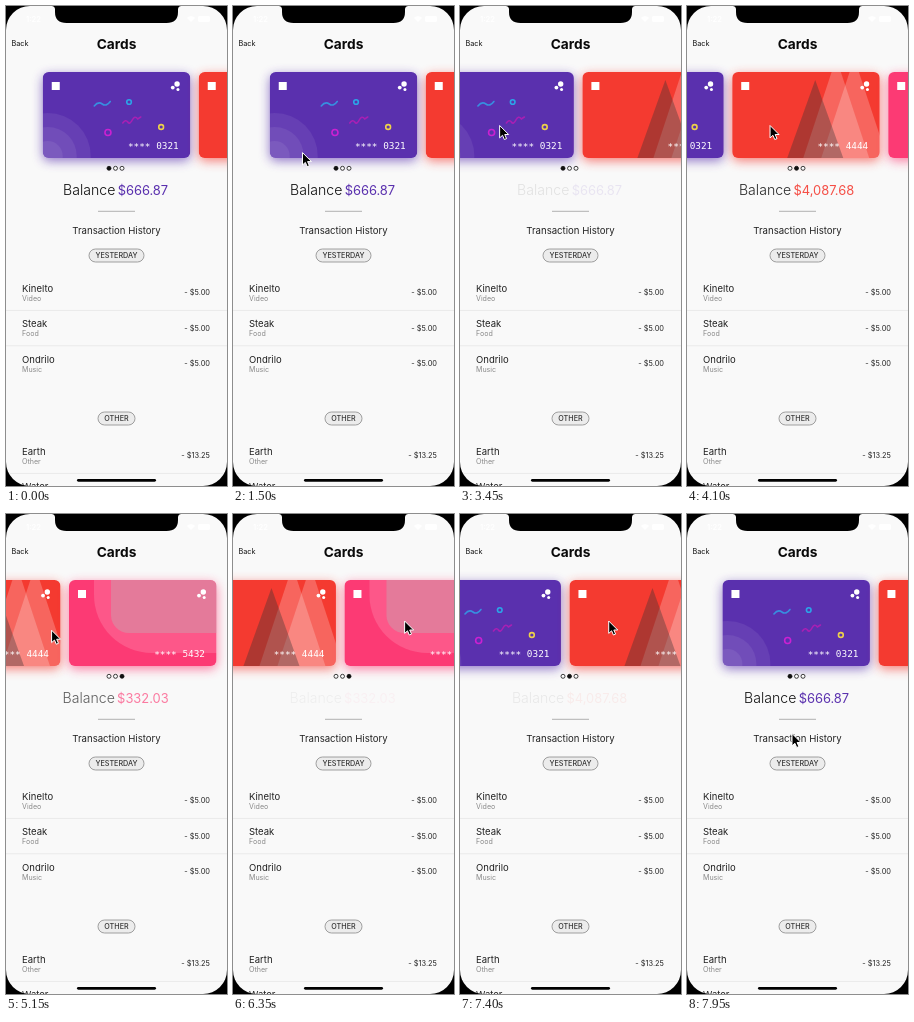
Recreate the animation shown at these times as an HTML page. Size 221 by 480 pixels, loop 8 s.

```html
<!DOCTYPE html>
<html lang="en">
<head>
<meta charset="utf-8">
<title>Cards</title>
<style>
html, body { margin: 0; width: 100%; height: 100%; overflow: hidden; background: #000; }
svg { display: block; width: 100%; height: 100%; font-family: Inter, "Open Sans", sans-serif; }
.num { font: 9.4px "DejaVu Sans Mono", monospace; fill: #fff; text-anchor: end; }
.mid { text-anchor: middle; }
.ring { fill: none; stroke-linecap: round; stroke-width: 1.6; }
</style>
</head>
<body>
<svg viewBox="0 0 221 480">
  <defs>
    <clipPath id="screen"><rect width="221" height="480" rx="24"/></clipPath>
    <clipPath id="face"><rect width="147.5" height="86" rx="6"/></clipPath>
    <filter id="blur" x="-20%" y="-35%" width="140%" height="170%"><feGaussianBlur stdDeviation="5.5"/></filter>
  </defs>
  <g clip-path="url(#screen)">
    <rect width="221" height="480" fill="#f9f9f9"/>
    <g fill="#fff">
      <text x="20" y="16" font-size="7.5" font-weight="600">1:22</text>
      <rect x="192" y="10" width="12" height="6" rx="1.5"/>
      <path d="M181 12q4-4 8 0l-4 4z"/>
    </g>
    <text x="5.5" y="40.3" font-size="7.3" fill="#111">Back</text>
    <text class="mid" x="110.5" y="43" font-size="13.7" font-weight="700" fill="#0a0a0a">Cards</text>
    <g id="cards"></g>
    <g id="dots" stroke="#111" stroke-width=".8"></g>
    <text id="balance" class="mid" x="109.6" y="188.9" font-size="14.1" font-weight="300" fill="#111">Balance<tspan id="amount" dx="2.3" font-size="12.9" font-weight="400"></tspan></text>
    <path d="M92 205.3H129" stroke="#aaa" stroke-width=".9"/>
    <text class="mid" x="110.5" y="228" font-size="9.6" fill="#222">Transaction History</text>
    <g id="list"></g>
    <rect x="71" y="473" width="79" height="2.7" rx="1.35"/>
  </g>
  <path d="M45.5 0Q49 0 49 3.5V6Q49 17 60.5 17H160.5Q172 17 172 6V3.5Q172 0 175.5 0Z"/>
  <path id="cursor" d="M0 0V12.4L2.9 9.800L4.700 14L6.900 13.100L5.100 9H9Z" stroke="#fff" stroke-width="1"/>
</svg>
<script>
const $ = id => document.getElementById(id);
const LOOP = 8000, PITCH = 156, LEFT = 36.75, PULL = 74, SETTLE = 115;

const cards = [
  { color: '#5a30ae', sum: '$666.87', last: '0321', art: `
    <g fill="#fff" fill-opacity=".07">${[43, 29, 15].map(r => `<circle cx="5" cy="84" r="${r}"/>`).join('')}</g>
    <g class="ring">
      <path d="M51.5 34q4-5 8-2t8-2.5" stroke="#378fe0"/>
      <circle cx="86.300" cy="30" r="2.300" stroke="#2ba4e8"/>
      <circle cx="65.200" cy="60.500" r="3" stroke="#cb20d2"/>
      <path d="M80 51q3-4 5-1t4.500-2t5.500-1l3-2" stroke="#a81fb4"/>
      <circle cx="118.400" cy="55" r="2.400" stroke="#ecd04a"/>
    </g>` },
  { color: '#f43a30', sum: '$4,087.68', last: '4444', art: `
    <path id="peak" d="M104 -14l33 100h-66z" fill="#fff" fill-opacity=".22"/>
    <use href="#peak" x="18"/>
    <path d="M83 8l28 78h-56z" fill="#333" fill-opacity=".36"/>` },
  { color: '#fc3a74', sum: '$332.03', last: '5432', art: `
    <path d="M25 0V15A58 58 0 0 0 83 73H148V0Z" fill="#fff" fill-opacity=".15"/>
    <path d="M42 0V35A18 18 0 0 0 60 53H148V0Z" fill="#b8b8b8" fill-opacity=".36"/>` }
];

$('cards').innerHTML = cards.map((c, i) => `<g transform="translate(${i * PITCH} 0)">
  <rect y="3" width="147.5" height="86" rx="6" fill="${c.color}" opacity=".65" filter="url(#blur)"/>
  <g clip-path="url(#face)"><rect width="147.5" height="86" fill="${c.color}"/>${c.art}</g>
  <rect x="9" y="10" width="8" height="8" fill="#fff"/>
  <g fill="#fff"><circle cx="134.300" cy="12" r="2.700"/><circle cx="130" cy="15.600" r="1.900"/><circle cx="135.200" cy="17.500" r="1.500"/></g>
  <text class="num" x="136" y="76.800"><tspan dy="1">****</tspan><tspan dy="-1"> ${c.last}</tspan></text></g>`).join('');

$('dots').innerHTML = cards.map((c, i) => `<circle cx="${103 + i * 6.5}" cy="162.300" r="2"/>`).join('');
const dots = [...$('dots').children];

const chip = (label, y, w) => `<rect x="${110.5 - w / 2}" y="${y}" width="${w}" height="13" rx="6.5" fill="#ececec" stroke="#8a8a8a" stroke-width=".8"/>
  <text class="mid" x="110.5" y="${y + 9.2}" font-size="7.200" font-weight="500" fill="#333">${label}</text>`;

const row = ([name, kind, cost], y) => `<text x="16" y="${y}" font-size="9.500" fill="#222">${name}</text>
  <text x="16" y="${y + 9.2}" font-size="7.100" fill="#888">${kind}</text>
  <text x="204" y="${y + 3.6}" font-size="7.400" text-anchor="end" fill="#222">- ${cost}</text>`;

// A chip followed by rows with a rule between them
const section = (label, y, w, rows) => chip(label, y, w) + rows.map((r, i) => {
  const base = y + 42.8 + i * 35.4;
  return row(r, base) + (i ? `<path d="M0 ${base - 16.8}H221" stroke="#e6e6e6" stroke-width=".8"/>` : '');
}).join('');

$('list').innerHTML =
  section('YESTERDAY', 243, 55, [['Kinelto', 'Video', '$5.00'], ['Steak', 'Food', '$5.00'], ['Ondrilo', 'Music', '$5.00']]) +
  section('OTHER', 406, 37, [['Earth', 'Other', '$13.25'], ['Water', 'Other', '$5.00']]);

// Each swipe holds the card from grab to release, then the page snaps
const swipes = [
  { grab: 1900, release: 3840, x: 110, y: 119.5, dir: 1 },
  { grab: 4390, release: 5020, x: 101, y: 119.5, dir: 1 },
  { grab: 5950, release: 6350, x: 98, y: 107, dir: -1 },
  { grab: 6850, release: 7475, x: 76, y: 107, dir: -1 }
];

const drag = (w, t) => PULL * Math.sin(Math.PI / 2 * (t - w.grab) / (w.release - w.grab));

function travel(w, t) {
  if (t < w.grab) return 0;
  if (t < w.release) return drag(w, t);
  return PITCH - (PITCH - PULL) * Math.exp((w.release - t) / SETTLE);
}

// The pointer glides from stop to stop between swipes
const stops = [
  { t: 50, x: 2, y: 168 }, { t: 850, x: 199, y: 67 }, { t: 1350, x: 33, y: 171 },
  ...swipes.flatMap(w => [
    { t: w.grab, x: w.x, y: w.y },
    { t: w.release, x: w.x - w.dir * PULL, y: w.y }
  ]),
  { t: 7950, x: 105, y: 219.5 }
];

function pointer(t) {
  const held = swipes.find(w => t >= w.grab && t < w.release);
  if (held) return [held.x - held.dir * drag(held, t), held.y];
  const next = stops.findIndex(p => p.t > t);
  const b = stops.at(next), a = next > 0 ? stops[next - 1] : b;
  const u = a === b ? 1 : (t - a.t) / (b.t - a.t), k = u * (2 - u);
  return [a.x + (b.x - a.x) * k, a.y + (b.y - a.y) * k];
}

function draw(t) {
  const s = swipes.reduce((sum, w) => sum + w.dir * travel(w, t), 0);
  const page = Math.round(s / PITCH), card = cards[page];
  $('cards').setAttribute('transform', `translate(${LEFT - s} 66)`);
  dots.forEach((d, i) => d.setAttribute('fill', i === page ? '#111' : '#f9f9f9'));
  $('amount').textContent = card.sum;
  $('amount').setAttribute('fill', card.color);
  $('balance').setAttribute('opacity', 1 - 2 * Math.abs(s / PITCH - page));
  $('cursor').setAttribute('transform', `translate(${pointer(t)})`);
  $('cursor').setAttribute('visibility', t < 50 ? 'hidden' : 'visible');
}

function tick() {
  draw(performance.now() % LOOP);
  requestAnimationFrame(tick);
}
draw(0);
requestAnimationFrame(tick);
</script>
</body>
</html>
```
